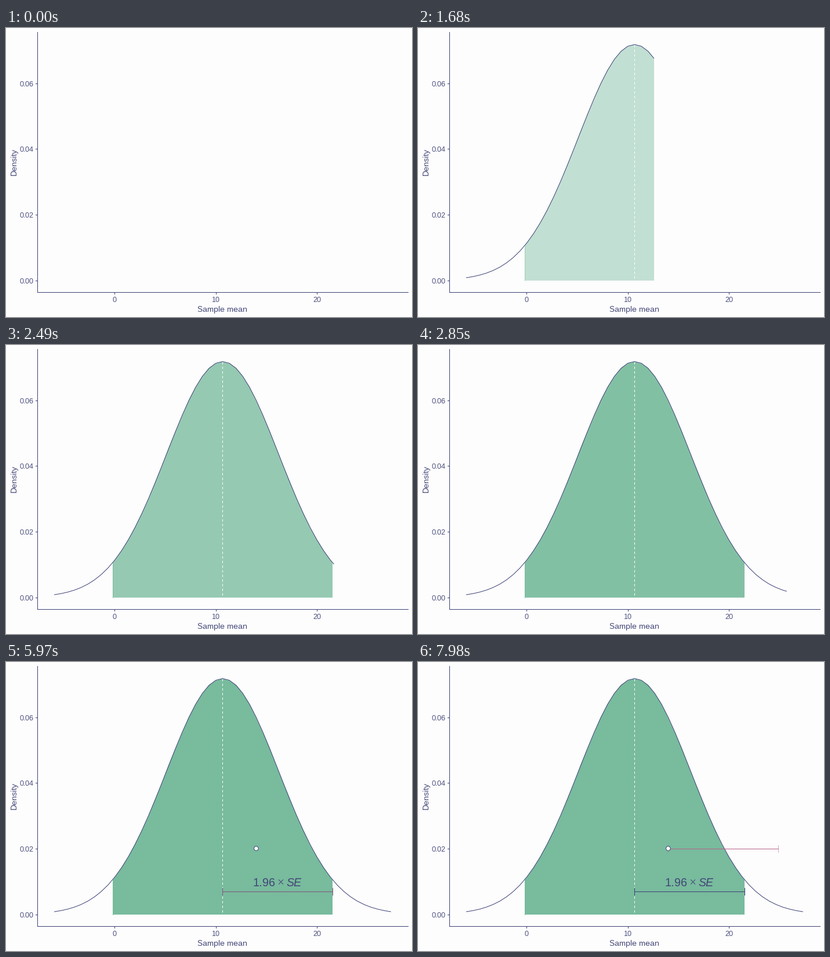
These frames come from a looping animation (700x500 px, 8000 ms). A matplotlib script:

```python
import numpy as np
import matplotlib.pyplot as plt
from matplotlib.animation import FuncAnimation
from matplotlib.patches import Circle

W, H, LOOP, STEP = 700, 500, 8000, 20
PX = 0.72  # one pixel in points at 100 dpi
NAVY, INK, GREEN, PINK = "#3c4076", "#444878", "#78bb9d", "#b95f89"
MEAN, SE, BASE, PEAK = 373.5, 96.8, 436.5, 408
LEFT, RIGHT = MEAN - 1.96 * SE, MEAN + 1.96 * SE
START, END = MEAN - 3 * SE, MEAN + 3 * SE
BAR_Y, DOT = 396.5, (431.5, 322.5)

plt.rcParams.update({"font.family": "Liberation Sans",
                     "text.hinting": "native", "text.hinting_factor": 1})
fig = plt.figure(figsize=(W / 100, H / 100), dpi=100, facecolor="#fdfdfd")
ax = fig.add_axes([0, 0, 1, 1])
# the small offset keeps pixel centres from snapping to the next pixel
ax.set(xlim=(0.1, W + 0.1), ylim=(H - 0.1, -0.1))
ax.axis("off")

knots = np.linspace(START, END, 51)
heights = BASE - PEAK * np.exp(-(((knots - MEAN) / SE) ** 2) / 2)


def line(xs=(), ys=(), color=NAVY, **kw):
    kw = {"lw": PX, "solid_capstyle": "projecting", **kw}
    return ax.plot(xs, ys, color=color, **kw)[0]


def label(x, y, s, size, ha="center", **kw):
    return ax.text(x, y, s, fontsize=size * PX, color=INK, ha=ha,
                   va="baseline", **kw)


def span(a, b):
    """Curve points between two x positions."""
    xs = np.concatenate([[a], knots[(knots > a) & (knots < b)], [b]])
    return xs, np.interp(xs, knots, heights)


def ramp(t, a, b):
    return min(max((t - a) / (b - a), 0.0), 1.0)


class Whisker:
    """Horizontal bar with a cap at each end."""

    def __init__(self, color, z):
        self.parts = [line(color=color, zorder=z) for _ in range(3)]

    def place(self, a, b, y, alpha, cap_alpha=1):
        caps = (y - 6, y + 6)
        shapes = (((a, b), (y, y)), ((a, a), caps), ((b, b), caps))
        for part, shape in zip(self.parts, shapes):
            part.set_data(*shape)
            part.set_alpha(alpha * cap_alpha if shape[1] is caps else alpha)


# axes
line([54.5, 54.5], [6.5, 456.5], zorder=1)
line([54.5, 693.5], [456.5, 456.5], zorder=1)
for i in range(4):
    y = BASE - 113.67 * i
    line([51.5, 53.5], [y, y])
    label(48, y + 5, f"{0.02 * i:.2f}", 12, ha="right")
for i in range(3):
    x = 187.5 + 174.3 * i
    line([x, x], [457.5, 459.5])
    label(x, 474, str(10 * i), 12)
label(373, 491, "Sample mean", 14)
label(18, 231, "Density", 14, rotation=90, rotation_mode="anchor")

# moving parts
area = ax.fill([LEFT] * 3, [BASE] * 3, color=GREEN, lw=0, snap=True,
               zorder=2)[0]
edge = line([LEFT, LEFT], [span(LEFT, RIGHT)[1][0], BASE], GREEN, zorder=3)
mean_line = line([MEAN, MEAN], [BASE - PEAK, BASE], "white", zorder=4,
                 linestyle=(0, (4, 4)), dash_capstyle="butt")
curve = line(zorder=5, solid_capstyle="butt")
bar = Whisker(NAVY, 6)
copy = Whisker(PINK, 7)
formula = [
    label(426, 388, "1.96", 20, ha="left", zorder=8),
    label(473.5, 388, "\u00d7", 22, zorder=8, family="Liberation Serif"),
    label(484, 388, "SE", 20, ha="left", zorder=8, style="italic"),
]
dot = ax.add_patch(Circle(DOT, 3.8, fc="white", ec=NAVY, lw=PX, zorder=9))


def update(k):
    t = (k * STEP + STEP // 2) // 30 * 30

    # reveal of the curve and the shaded area
    head = min(START + 0.1956 * (t - 24), END)
    curve.set_visible(t >= 60)
    if t >= 60:
        curve.set_data(*span(START, head))
    shaded = head > LEFT
    area.set_visible(shaded)
    edge.set_visible(shaded)
    if shaded:
        stop = min(head, RIGHT)
        xs, ys = span(LEFT, stop)
        area.set_xy(np.column_stack([np.r_[LEFT, xs, stop],
                                     np.r_[BASE, ys, BASE]]))
        tint = ramp(t, 590, 3030)
        area.set_alpha(tint)
        edge.set_alpha(tint)
    mean_line.set_visible(head >= MEAN)

    # margin bar opens from its middle, then its formula fades in
    mid = (MEAN + RIGHT) / 2
    half = (RIGHT - MEAN) / 2 * ramp(t, 3320, 4500)
    bar.place(mid - half, mid + half, BAR_Y, ramp(t, 3000, 3300))
    for part in formula:
        part.set_alpha(ramp(t, 4500, 4800))
    dot.set_alpha(ramp(t, 4920, 5670))

    # a copy of the bar travels to the dot, then its caps start to fade
    move = ramp(t, 6180, 7680)
    dx, dy = move * (DOT[0] - MEAN), move * (DOT[1] - BAR_Y)
    copy.place(MEAN + dx, RIGHT + dx, BAR_Y + dy, ramp(t, 5700, 6180),
               1 - ramp(t, 7950, 8010))


anim = FuncAnimation(fig, update, frames=LOOP // STEP, interval=STEP,
                     init_func=lambda: update(0), repeat=True, repeat_delay=0)
plt.show()
```
